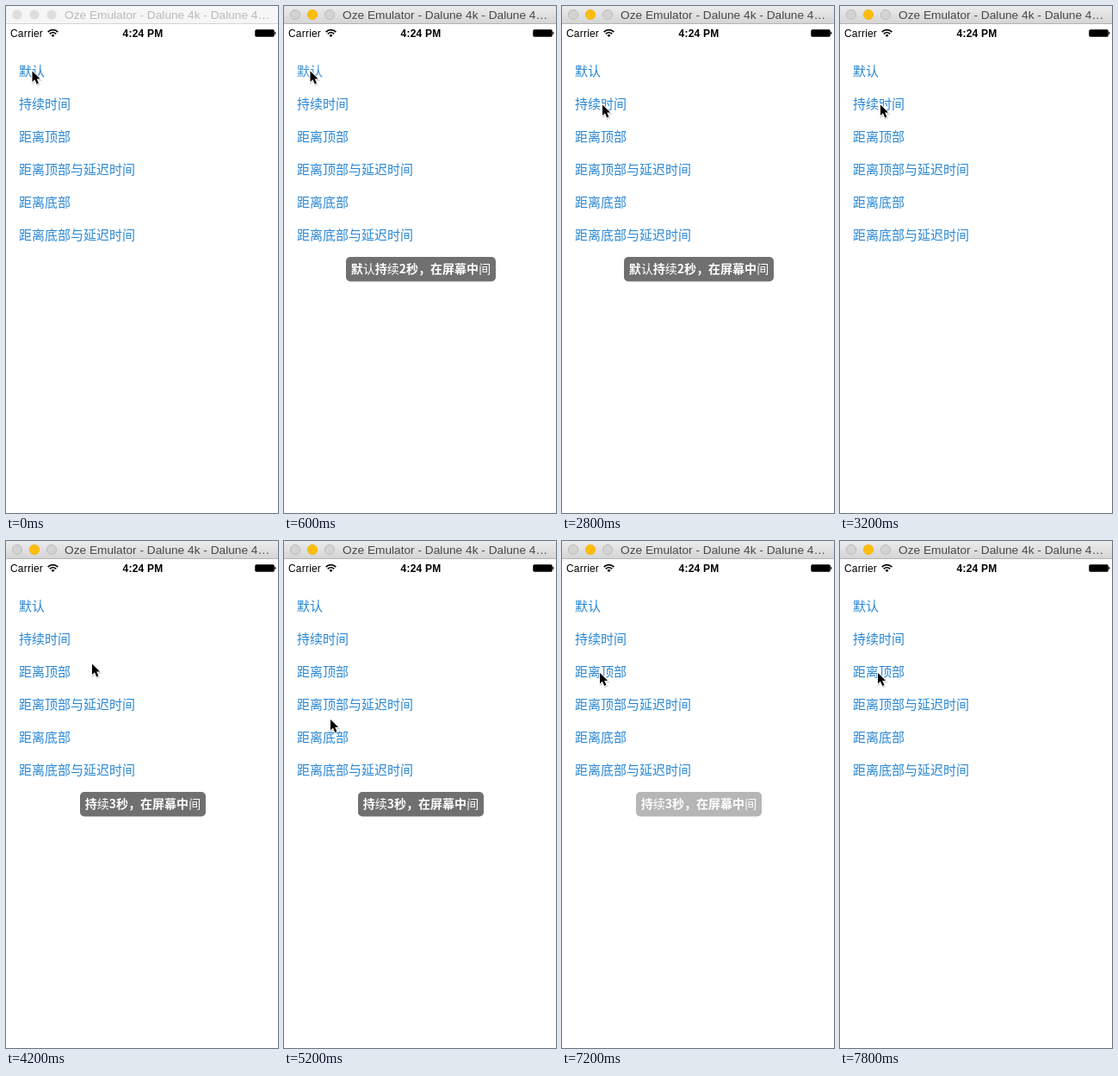
An HTML page for the animation above (8 s loop, 316 by 588 pixels).

```html
<!DOCTYPE html>
<html lang="zh-CN">
<head>
<meta charset="utf-8">
<style>
  html, body { margin: 0; width: 100%; height: 100%; overflow: hidden; background: #fff; }
  svg { display: block; width: 316px; height: 588px; font-family: "Liberation Sans", Arial, sans-serif; }
  .cjk { font-family: "Noto Sans CJK SC", "Noto Sans CJK", sans-serif; }
  #links { font-size: 15px; fill: #2a87d4; }
  .toast { font-size: 14px; font-weight: 700; fill: #fff; text-anchor: middle; }
  .toast rect { fill: #707070; }
  .thin { font-weight: 400; }

  #titleBar { fill: #f6f6f6; }
  #barEdge { fill: #d4d4d4; }
  #title { fill: #bababa; }
  #lights { fill: #dedede; }
  .active #titleBar { fill: url(#bar); }
  .active #barEdge { fill: #b4b4b4; }
  .active #title { fill: #484848; }
  .active #lights { fill: #d3d3d3; stroke: #bcbcbc; }
  .active #minimise { fill: #fdbd0c; stroke: #f6b713; }
</style>
</head>
<body>
<svg id="stage" viewBox="0 0 316 588">
  <defs>
    <linearGradient id="bar" x2="0" y2="1">
      <stop stop-color="#ececec"/>
      <stop offset="1" stop-color="#d5d5d5"/>
    </linearGradient>
    <path id="arrow" d="M0 0V13.5L3.2 10.6 5.6 16 8 15 5.6 9.8H9.8Z" stroke-width="2" paint-order="stroke"/>
  </defs>

  <rect id="titleBar" width="316" height="20"/>
  <rect id="barEdge" y="20" width="316" height="1"/>
  <g id="lights">
    <circle cx="13" cy="10" r="5.6"/>
    <circle id="minimise" cx="33" cy="10" r="5.6"/>
    <circle cx="53" cy="10" r="5.6"/>
  </g>
  <text id="title" x="68" y="15" font-size="13.7">Oze Emulator - Dalune 4k - Dalune 4…</text>

  <text x="5" y="35.7" font-size="12" letter-spacing=".2">Carrier</text>
  <g fill="none" stroke="#000" stroke-width="1.7">
    <path d="M48.7 30.1a8.2 8.2 0 0 1 11.6 0M50.8 32.3a5.2 5.2 0 0 1 7.4 0"/>
    <path d="M54.5 36l-2-2.1a2.8 2.8 0 0 1 4 0z" fill="#000" stroke="none"/>
  </g>
  <text x="159" y="35.7" font-size="12" font-weight="700" letter-spacing=".2" text-anchor="middle">4:24 PM</text>
  <rect x="289.5" y="27.5" width="22" height="8" rx="1.5" stroke="#000" stroke-opacity=".5"/>
  <path d="M312.2 29.8q1.3 .3 1.3 1.7t-1.3 1.7z"/>

  <g id="links" class="cjk"></g>

  <g id="first" class="toast cjk">
    <rect x="72" y="291" width="174" height="28.5" rx="5"/>
    <text x="159" y="310.3">默<tspan class="thin">认</tspan>持<tspan class="thin">续</tspan>2秒，在屏幕中<tspan class="thin">间</tspan></text>
  </g>
  <g id="second" class="toast cjk">
    <rect x="86" y="291" width="146" height="28.5" rx="5"/>
    <text x="159" y="310.3">持<tspan class="thin">续</tspan>3秒，在屏幕中<tspan class="thin">间</tspan></text>
  </g>

  <g id="cursor">
    <use href="#arrow" x=".6" y="1.2" stroke="#000" opacity=".2"/>
    <use href="#arrow" stroke="#fff"/>
  </g>
</svg>
<script>
const LOOP = 8000, STEP = 200, FADE = 400;
const $ = id => document.getElementById(id);

const labels = ['默认', '持续时间', '距离顶部', '距离顶部与延迟时间', '距离底部', '距离底部与延迟时间'];
$('links').innerHTML = labels.map((s, i) => `<text x="15" y="${81 + 38 * i}">${s}</text>`).join('');
const [firstLink, secondLink] = $('links').children;

// Where the pointer goes after its start, and when
const start = { x: 30.5, y: 75.5 };
const moves = [
  { from: 1200, to: 2400, x: 47, y: 114.5 },
  { from: 3600, to: 4200, x: 100, y: 142.5 },
  { from: 4800, to: 5200, x: 54, y: 207 },
  { from: 5400, to: 5800, x: 62, y: 149.5 },
  { from: 6400, to: 7000, x: 44, y: 153 },
];

const ramp = (t, from, to) => Math.min(1, Math.max(0, (t - from) / (to - from)));
const ease = p => p * p * (3 - 2 * p);
const shown = (t, enter, leave) => ramp(t, enter, enter + FADE) - ramp(t, leave, leave + FADE);
const pressed = (t, click) => 1 - (ramp(t, click - STEP, click) - ramp(t, click, click + 500)) / 2;
const fade = (el, opacity) => el.setAttribute('opacity', opacity);

function pointer(t) {
  return moves.reduce((at, m) => {
    const p = ease(ramp(t, m.from, m.to));
    return { x: at.x + (m.x - at.x) * p, y: at.y + (m.y - at.y) * p };
  }, start);
}

function draw(now) {
  const t = Math.floor(now % LOOP / STEP) * STEP;
  const { x, y } = pointer(t);

  $('stage').classList.toggle('active', t >= STEP);
  fade(firstLink, pressed(t, 200));
  fade(secondLink, pressed(t, 3600));
  fade($('first'), shown(t, 200, 2800));
  fade($('second'), shown(t, 3600, 7000));
  $('cursor').setAttribute('transform', `translate(${x} ${y}) scale(.93)`);
  requestAnimationFrame(draw);
}
draw(0);
</script>
</body>
</html>
```
